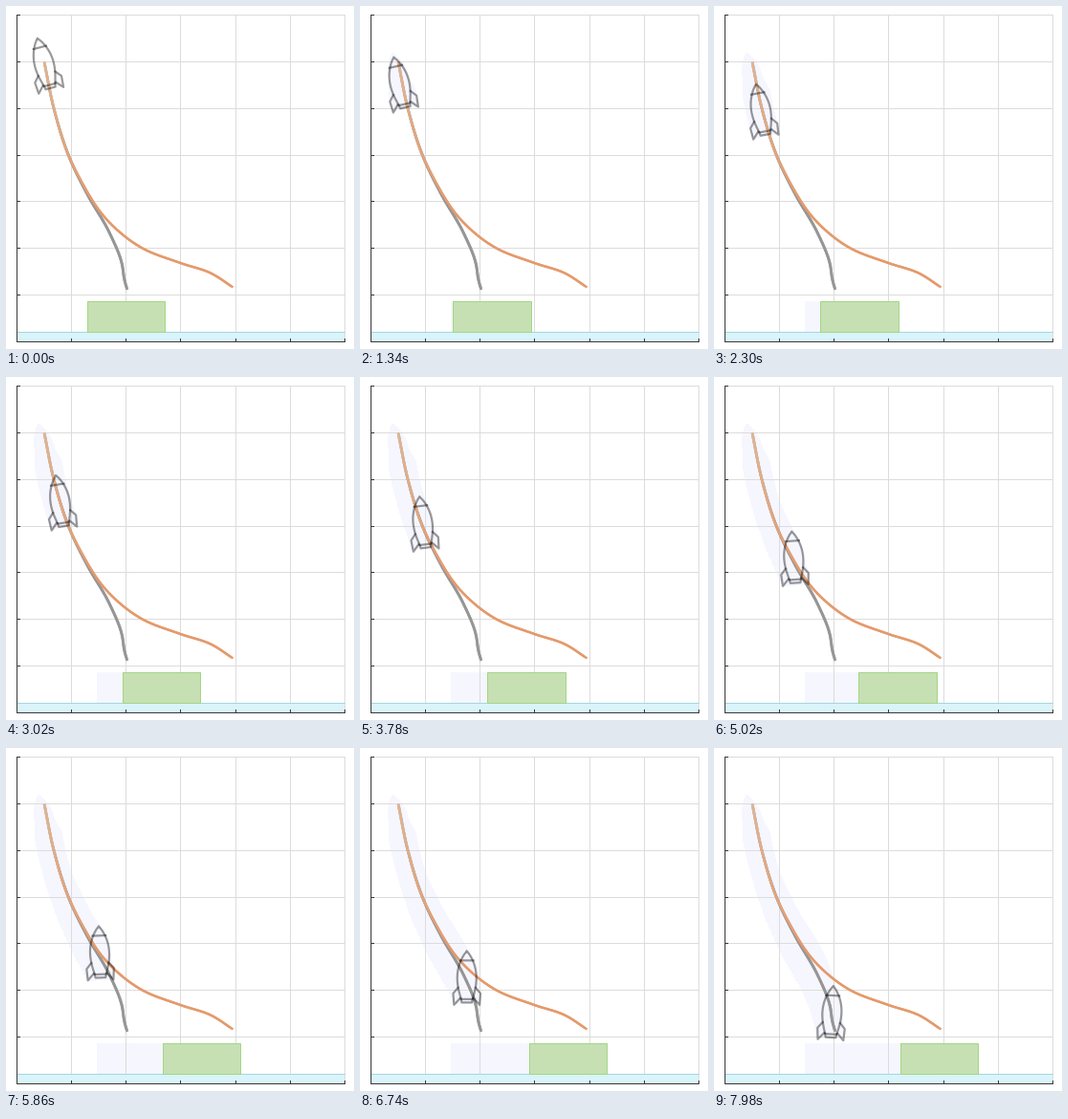
Animation, 364 px wide and 359 px high, one loop 8 s. Source, as a matplotlib script:

```python
import numpy as np
import matplotlib.pyplot as plt
from matplotlib.animation import FuncAnimation
from matplotlib.collections import LineCollection, PolyCollection
from matplotlib.patches import Rectangle

W, H, DPI = 364, 359, 100
PX = 72 / DPI
TICK, LOOP, START, STEP = 20, 8000, 500, 40
LAST = (LOOP - START) // STEP + 1
TRAIL_START, TRAIL_SHOWN = 18, 22

LEFT, RIGHT, TOP, BOTTOM, FLOOR = 11, 354, 9, 351, 341
X_GRID = np.round(np.linspace(LEFT, RIGHT, 7))
Y_GRID = np.round(np.linspace(TOP, BOTTOM, 8))
GRID, AXIS, GHOST = "#dcdcdc", "#383838", "#f6f6ff"


def smooth(u, knots, vals):
    """Cubic Hermite interpolation through a few key values."""
    slope = np.gradient(vals, knots)
    i = np.clip(np.searchsorted(knots, u, side="right") - 1, 0, len(knots) - 2)
    h = knots[i + 1] - knots[i]
    s = (u - knots[i]) / h
    return ((1 + 2 * s) * (1 - s) ** 2 * vals[i] + s * (1 - s) ** 2 * h * slope[i]
            + s * s * (3 - 2 * s) * vals[i + 1] + s * s * (s - 1) * h * slope[i + 1])


def curve(points, n=80):
    pts = np.array(points, float)
    d = np.r_[0, np.cumsum(np.hypot(*np.diff(pts, axis=0).T))]
    u = np.linspace(0, d[-1], n)
    return np.column_stack([smooth(u, d, pts[:, 0]), smooth(u, d, pts[:, 1])])


# Rocket outline around its centre, y pointing down
v = np.linspace(0, 1, 24)
SIDE = np.column_stack([10 * np.sin(0.8 * np.pi * v ** 0.8), 50 * v - 27])
MIRROR = np.array([-1, 1])
BODY = np.vstack([SIDE, SIDE[::-1] * MIRROR])
FIN = np.array([(9.2, 11), (14.3, 17), (13.4, 29), (7, 22)])
BASE = np.array([(-6, 23), (-5.3, 26.5), (5.3, 26.5), (6, 23)])
CAP = np.array([(-6.8, -17.5), (6.8, -17.5)])
PARTS = [BODY, FIN, FIN * MIRROR, BASE, CAP]
HULL = np.vstack([SIDE[:14], FIN[1:3], FIN[2:0:-1] * MIRROR, SIDE[13::-1] * MIRROR])

ROUTE = curve([(37, 55.5), (41.3, 80), (65.4, 152), (83, 188.5),
               (111.4, 239), (123.4, 276.5)])


def pose(k):
    """Centre and lean of the rocket: steady descent while turning upright."""
    if k == 0:
        return 39.8, 60.3, 14.8
    p = (k - 1) / (LAST - 1)
    y = 55.5 + 221 * p
    return np.interp(y, ROUTE[:, 1], ROUTE[:, 0]), y, 15 - 18 * p


def place(shape, k):
    x, y, lean = pose(k)
    c, s = np.cos(np.radians(lean)), np.sin(np.radians(lean))
    return shape @ np.array([[c, -s], [s, c]]) + (x, y)


def box_x(k):
    return 84.8 + 0.588 * max(k - 1, 0)


fig = plt.figure(figsize=(W / DPI, H / DPI), dpi=DPI, facecolor="white")
ax = fig.add_axes([0, 0, 1, 1])
ax.set_xlim(0, W)
ax.set_ylim(H, 0)
ax.axis("off")


def line(xs, ys, color, width=1, z=1, **kw):
    return ax.plot(xs, ys, color=color, lw=width * PX, zorder=z, **kw)[0]


def block(x, y, w, h, fill, z, edge="none"):
    return ax.add_patch(Rectangle((x, y), w, h, fc=fill, ec=edge, lw=PX, zorder=z))


def fading(points, pale, full, width, z):
    """Trajectory that starts pale and reaches its full colour halfway."""
    p = curve(points, 160)
    mix = np.clip(np.linspace(0, 2, len(p) - 2), 0, 1)[:, None]
    colors = (np.array(pale) * (1 - mix) + np.array(full) * mix) / 255
    segs = np.stack([p[:-2], p[1:-1], p[2:]], axis=1)
    ax.add_collection(LineCollection(segs, colors=colors, lw=width * PX, zorder=z))


# Grid, floor and axes
for x in X_GRID:
    line([x, x], [TOP, BOTTOM], GRID)
    line([x, x], [BOTTOM - 3, BOTTOM], AXIS, z=6)
for y in Y_GRID:
    line([LEFT, RIGHT], [y, y], GRID)
    line([LEFT, LEFT + 3], [y, y], AXIS, z=6)
block(LEFT, FLOOR, RIGHT - LEFT, BOTTOM - FLOOR, "#d9f4fa", 2)
line([LEFT, RIGHT], [FLOOR, FLOOR], "#a4d6e0", z=2)
line([LEFT, LEFT, RIGHT], [TOP, BOTTOM, BOTTOM], AXIS, z=6)

# Two trajectories sharing their first part
SHARED = [(40, 58.5), (50, 107), (66.5, 159)]
fading(SHARED + [(85.3, 197.5), (108.3, 237.5), (121.3, 270), (124, 287), (126.8, 297)],
       (190, 190, 185), (150, 150, 150), 2.8, 3)
fading(SHARED + [(78, 182), (104, 222), (140, 252), (182.5, 269), (215, 280),
                 (237.5, 294.5)],
       (224, 180, 146), (228, 154, 108), 2.4, 4)

# Moving parts
swept = PolyCollection([], facecolors=GHOST, edgecolors="none",
                       antialiaseds=False, zorder=0.5)
ax.add_collection(swept)
box_trail = block(box_x(TRAIL_START), 309, 0, 32, GHOST, 0.5)
box = block(box_x(0), 309, 81.5, 31.5, "#c6e0b4", 5, "#a2d684")
rocket = [line([], [], "black", 2.2, 7, alpha=0.4, solid_joinstyle="round")
          for _ in PARTS]
HULLS = [place(HULL, k) for k in range(TRAIL_START, LAST + 1)]


def draw(i):
    t = i * TICK
    k = 0 if t < START else (t - START) // STEP + 1
    for art, part in zip(rocket, PARTS):
        art.set_data(*place(part, k).T)
    x = box_x(k)
    box.set_x(x)
    shown = k >= TRAIL_SHOWN
    swept.set_verts(HULLS[:k - TRAIL_START + 1:3] if shown else [])
    box_trail.set_width(x - box_x(TRAIL_START) if shown else 0)
    return [swept, box_trail, box, *rocket]


anim = FuncAnimation(fig, draw, frames=LOOP // TICK, interval=TICK,
                     init_func=lambda: draw(0), repeat=True, repeat_delay=0)
plt.show()
```
